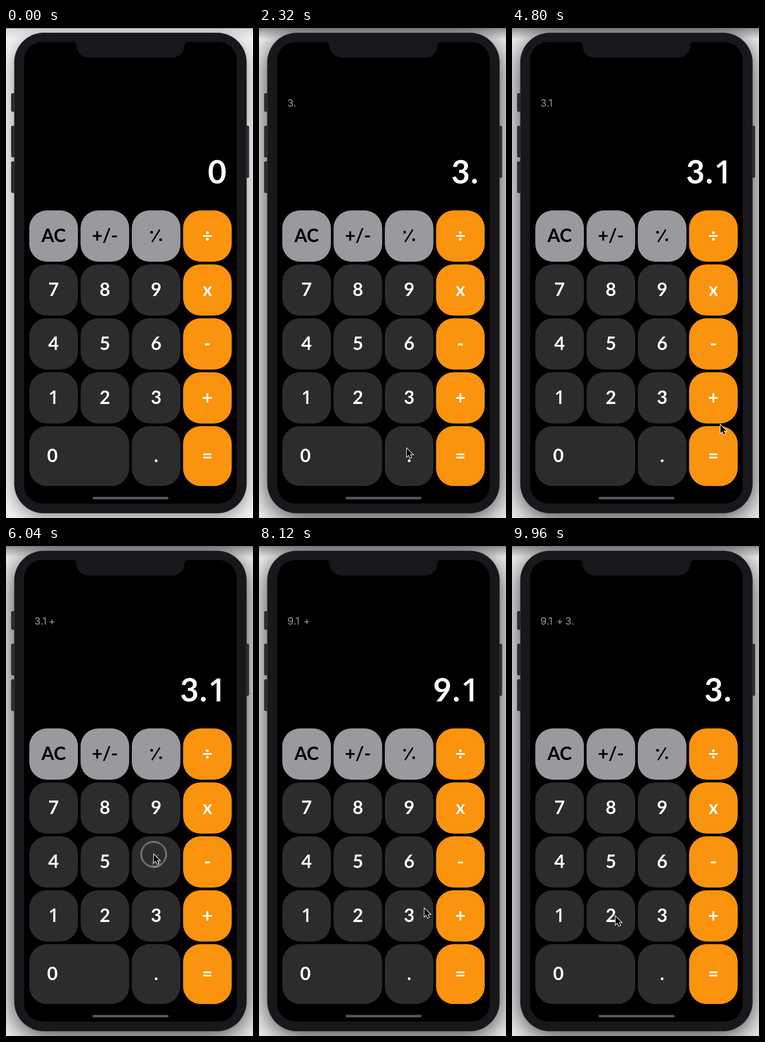
Write an HTML page with a canvas that moves like this. It is 532 px wide and 1053 px high and loops after 10 s.

```html
<!DOCTYPE html>
<html lang="en">
<head>
<meta charset="utf-8">
<title>Calculator</title>
<style>
  html, body { margin: 0; width: 100%; height: 100%; overflow: hidden; background: #f4f4f6; }
  canvas { display: block; }
</style>
</head>
<body>
<canvas id="stage" width="532" height="1053"></canvas>
<script>
const ctx = document.getElementById('stage').getContext('2d');
const LOOP = 10000, STEP = 40;
const BODY = '#19171b', GRAY = '#9b999e', DARK = '#2d2b2e', ORANGE = '#fa930e';

// Keypad grid: equal cells, with a taller last row and a double-width zero.
const PITCH_X = 110.4, PITCH_Y = 115.9, GAP = 5.7;
const keys = ['AC +/- ٪ ÷', '789x', '456-', '123+', '0_.='].flatMap((row, r) =>
  (r ? [...row] : row.split(' ')).map((label, c) => {
    const x = 50.2 + c * PITCH_X, y = 392 + r * PITCH_Y;
    const w = PITCH_X * (label === '0' ? 2 : 1) - GAP;
    const h = PITCH_Y + (r === 4 ? 18.5 : 0) - GAP;
    const light = r === 0 && c < 3;
    return {
      label, x, y, w, h,
      cx: label === '0' ? 100 : x + w / 2,
      cy: y + h / 2,
      fill: c === 3 ? ORANGE : light ? GRAY : DARK,
      ink: light ? '#000' : '#fff',
    };
  })).filter(key => key.label !== '_');

// One character per beat; a space is a rest.
const SCORE = '3 .   1  + 6 = + 3 .';
const FIRST = 1180, BEAT = 425, HOLD = 250, SETTLE = 80;

function press(state, k) {
  const { big, line, sum, fresh, solved } = state;
  if (k === '+') {
    return { big, line: solved ? big + '  +' : line + ' +', sum: +big, fresh: true };
  }
  if (k === '=') {
    return { big: String(+(sum + +big).toFixed(8)), line: line + ' =', fresh: true, solved: true };
  }
  return { big: fresh ? k : big + k, line: line + (fresh && line ? ' ' : '') + k, sum };
}

const start = { big: '0', line: '', sum: 0, fresh: true };
let state = start;
const taps = [...SCORE].flatMap((k, beat) => {
  if (k === ' ') return [];
  const down = FIRST + beat * BEAT;
  state = press(state, k);
  return [{ down, up: down + HOLD, state, key: keys.find(key => key.label === k) }];
});

// The pointer rests on every tapped key and wanders through a few points between.
const wander = [
  [320, 485, 700], [3400, 314, 810], [4800, 448, 852],
  [7120, 431, 882], [9000, 288, 796], [9960, 222, 795],
];
const stops = taps.flatMap(({ down, up, key }) =>
  [down - SETTLE, up].map(t => [t, key.cx - 6, key.cy - 17]))
  .concat(wander).sort((a, b) => a[0] - b[0]);

function box(x, y, w, h, r, fill) {
  ctx.beginPath();
  ctx.roundRect(x, y, w, h, r);
  ctx.fillStyle = fill;
  ctx.fill();
}

function circle(x, y, r) {
  ctx.beginPath();
  ctx.arc(x, y, r, 0, 2 * Math.PI);
}

// Open Sans supplies the "1" without a foot.
function setFont(size, text) {
  ctx.font = text === '1' ? `600 ${size}px "Open Sans", sans-serif` : `700 ${size}px Lato, sans-serif`;
}

function drawBackdrop(focus) {
  ctx.fillStyle = '#f4f4f6';
  ctx.fillRect(0, 0, 532, 1053);
  ctx.save();
  ctx.shadowColor = `rgba(0, 0, 0, ${0.42 + 0.36 * focus})`;
  ctx.shadowBlur = 38 + 20 * focus;
  ctx.shadowOffsetY = 10;
  box(18, 10.5, 500, 1032, 64, BODY);
  ctx.restore();

  const shade = ctx.createLinearGradient(0, 0, 0, 24);
  shade.addColorStop(0, `rgba(0, 0, 0, ${0.12 + 0.28 * focus})`);
  shade.addColorStop(1, 'rgba(0, 0, 0, 0)');
  ctx.fillStyle = shade;
  ctx.fillRect(0, 0, 532, 24);
  ctx.fillStyle = '#777679';
  ctx.fillRect(0, 0, 532, 1);
}

function drawPhone() {
  box(11, 140, 10, 40, 3, DARK);
  for (const y of [210, 286.5]) box(11, y, 10, 68, 3, DARK);
  box(513, 210, 10.5, 112, 3, DARK);
  box(17.5, 10, 501, 1033, 64, '#39383b');
  box(18.5, 11, 499, 1031, 63, BODY);
  box(39, 30, 458, 992, 39, '#000');

  // Notch with flared shoulders
  ctx.beginPath();
  ctx.moveTo(144, 30);
  ctx.arcTo(152, 30, 152, 38, 8);
  ctx.arcTo(152, 63.5, 178, 63.5, 25);
  ctx.arcTo(384, 63.5, 384, 38, 25);
  ctx.arcTo(384, 30, 392, 30, 8);
  ctx.fillStyle = BODY;
  ctx.fill();
  box(186.5, 1007.5, 163.5, 5.5, 2.75, '#565558');
}

function drawPercent(x, y) {
  ctx.lineWidth = 3.2;
  ctx.beginPath();
  ctx.moveTo(x + 8, y - 14);
  ctx.lineTo(x - 9, y + 13);
  ctx.stroke();
  for (const side of [-1, 1]) {
    circle(x + side * 9.7, y + side * 8, 3);
    ctx.fill();
  }
}

function drawKey(key, pressed) {
  box(key.x, key.y, key.w, key.h, 38, key.fill);
  ctx.save();
  ctx.globalAlpha = pressed ? 0.15 : 1;
  ctx.fillStyle = ctx.strokeStyle = key.ink;
  if (key.label === '٪') {
    drawPercent(key.cx, key.cy);
  } else {
    setFont(39.5, key.label);
    ctx.textAlign = 'center';
    ctx.fillText(key.label, key.cx, key.cy + 13.3);
  }
  ctx.restore();
}

function drawDisplay({ big, line }) {
  ctx.fillStyle = '#fff';
  ctx.textAlign = 'center';
  let right = 474.5;
  for (const char of [...big].reverse()) {
    const cell = char === '.' ? 20.5 : 39.3;
    setFont(69, char);
    ctx.fillText(char, right - cell / 2, 333.5);
    right -= cell;
  }
  ctx.fillStyle = '#929292';
  ctx.textAlign = 'left';
  ctx.font = '400 22px Inter, sans-serif';
  ctx.wordSpacing = '-2px';
  ctx.fillText(line, 61, 168.5);
  ctx.wordSpacing = '0px';
}

function pointerAt(t) {
  const i = stops.findIndex(stop => stop[0] > t);
  if (i === 0) return null;
  if (i < 0) return stops.at(-1).slice(1);
  const [t0, x0, y0] = stops[i - 1], [t1, x1, y1] = stops[i];
  const u = (t - t0) / (t1 - t0);
  const e = u * u * (3 - 2 * u);
  return [x0 + (x1 - x0) * e, y0 + (y1 - y0) * e];
}

const arrow = new Path2D('M1 1V18.5L5 14.8L8 21.5L11 20.2L8.1 13.6H13.7Z');

function drawPointer([x, y], pressed) {
  ctx.save();
  ctx.translate(x, y);
  if (pressed) {
    ctx.strokeStyle = 'rgba(255, 255, 255, 0.7)';
    ctx.lineWidth = 1;
    for (const r of [28, 25.8]) {
      circle(0.7, 0.7, r);
      ctx.stroke();
    }
  }
  ctx.strokeStyle = '#fff';
  ctx.lineWidth = 2.4;
  ctx.stroke(arrow);
  ctx.fillStyle = '#000';
  ctx.fill(arrow);
  ctx.restore();
}

function draw(t) {
  const last = taps.filter(tap => t >= tap.up).at(-1);
  const active = taps.find(tap => t >= tap.down && t < tap.up);
  const pointer = pointerAt(t);
  drawBackdrop(Math.min(1, Math.max(0, (t - 1040) / 200)));
  drawPhone();
  for (const key of keys) drawKey(key, active?.key === key);
  drawDisplay(last ? last.state : start);
  if (pointer) drawPointer(pointer, active);
}

function tick() {
  const t = performance.now() % LOOP;
  draw(Math.floor(t / STEP) * STEP);
  requestAnimationFrame(tick);
}
tick();
</script>
</body>
</html>
```
